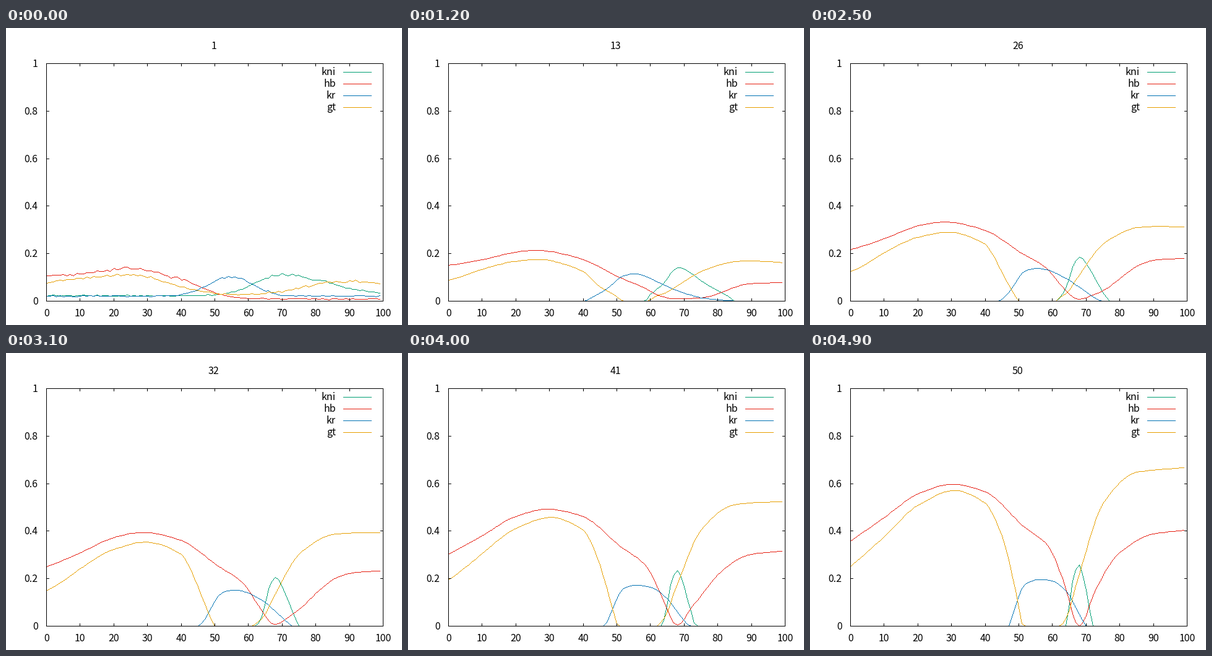
Write a matplotlib script that moves like this. It is 640 px wide and 480 px high and loops after 5000 ms.

```python
import numpy as np
import matplotlib.pyplot as plt
from matplotlib.animation import FuncAnimation

W, H, DPI = 640, 480, 100
FRAMES, INTERVAL = 50, 100
LEFT, RIGHT, TOP, BOTTOM = 65, 609, 57, 441
PX = 72 / DPI
POS = np.arange(100)


def bump(center, left, right=None):
    width = np.where(POS < center, left, right or left)
    return np.exp(-((POS - center) / width) ** 2)


def falling_edge(center, width):
    return 1 / (1 + np.exp((POS - center) / width))


def smooth_profile(points):
    """Shape-preserving cubic through a few (position, level) points."""
    xs, ys = np.array(points, float).T
    h = np.diff(xs)
    d = np.diff(ys) / h
    same_sign = d[:-1] * d[1:] > 0
    total = np.where(same_sign, d[:-1] + d[1:], 1)
    inner = np.where(same_sign, 2 * d[:-1] * d[1:] / total, 0)
    slope = np.concatenate([d[:1], inner, d[-1:]])
    k = np.clip(np.searchsorted(xs, POS, side="right") - 1, 0, len(h) - 1)
    t = (POS - xs[k]) / h[k]
    return (ys[k] * (1 + 2 * t) * (1 - t) ** 2
            + ys[k + 1] * t ** 2 * (3 - 2 * t)
            + h[k] * t * (1 - t) * (slope[k] * (1 - t) - slope[k + 1] * t))


# Every gene grows from a start to an end profile; negative levels are clipped,
# "power" eases the growth and "detour" bends the way between the two.
GENES = {
    "kni": dict(
        color="#009e73",
        start=0.023 + 0.088 * bump(70, 11, 20),
        end=smooth_profile([(0, -0.7), (50, -0.7), (57, -0.48), (60, -0.17), (64, 0),
                            (66, 0.19), (68, 0.258), (70, 0.15), (72, 0), (75, -0.17),
                            (82, -0.3), (91, -0.7), (99, -0.7)]),
        power=1.36,
        detour=0.2 * bump(73, 5)),
    "hb": dict(
        color="#e51e10",
        start=0.009 + (0.097 + 0.03 * bump(24, 12)) * falling_edge(46, 4),
        end=smooth_profile([(0, 0.358), (10, 0.457), (20, 0.556), (30, 0.597), (40, 0.566),
                            (51, 0.425), (59, 0.332), (63, 0.2), (68, 0), (73, 0.16),
                            (80, 0.31), (90, 0.388), (99, 0.403)]),
        power=1.24 + 1.7 * bump(71, 9),
        detour=0),
    "kr": dict(
        color="#0072b2",
        start=0.021 + 0.08 * bump(55, 9.5, 9),
        end=smooth_profile([(0, -0.4), (34, -0.38), (42, -0.12), (47, 0), (50, 0.125),
                            (52, 0.178), (56, 0.196), (60, 0.19), (64, 0.148), (70, 0),
                            (73, -0.05), (78, -0.07), (99, -0.25)]),
        power=1.36,
        detour=0.1 * bump(70, 5)),
    "gt": dict(
        color="#e69f00",
        start=0.025 + 0.085 * bump(25, 36, 16) + 0.06 * bump(88, 16, 25),
        end=smooth_profile([(0, 0.25), (10, 0.376), (20, 0.508), (31, 0.571), (40, 0.517),
                            (45, 0.38), (51, 0.01), (56, -0.35), (62, -0.01), (64, 0.03),
                            (68, 0.22), (75, 0.515), (85, 0.648), (99, 0.667)]),
        power=1.36 + 0.8 * bump(47, 4) + 0.55 * bump(0, 7),
        detour=-0.25 * bump(50, 4)),
}

rng = np.random.default_rng(4)
for gene in GENES.values():
    gene["noise"] = rng.normal(size=len(POS))


def levels(gene, i):
    s = (i / (FRAMES - 1)) ** gene["power"]
    level = gene["start"] * (1 - s) + gene["end"] * s + gene["detour"] * s * (1 - s)
    level = np.maximum(level, 0)
    level += 0.009 * np.exp(-0.45 * i) * np.sqrt(level) * gene["noise"]
    return np.maximum(level, 0)


def px_x(value):
    return np.rint(LEFT + value / 100 * (RIGHT - LEFT))


def px_y(value):
    return np.rint(BOTTOM - value * (BOTTOM - TOP))


def pixel_path(xs, ys):
    """Hard-edged polyline: one short dash inside every pixel it crosses."""
    px, py = [], []
    for x0, y0, x1, y1 in zip(xs[:-1], ys[:-1], xs[1:], ys[1:]):
        count = int(max(abs(x1 - x0), abs(y1 - y0))) + 1
        px.append(np.rint(np.linspace(x0, x1, count)))
        py.append(np.rint(np.linspace(y0, y1, count)))
    px, py = np.concatenate(px), np.concatenate(py) + 0.5
    gap = np.full_like(px, np.nan)
    return (np.stack([px + 0.3, px + 0.7, gap], axis=1).ravel(),
            np.stack([py, py, gap], axis=1).ravel())


plt.rcParams["font.family"] = "Noto Sans CJK JP"
plt.rcParams["path.simplify"] = False
fig = plt.figure(figsize=(W / DPI, H / DPI), dpi=DPI, facecolor="white")
ax = fig.add_axes([0, 0, 1, 1])
ax.set_xlim(0, W)
ax.set_ylim(H, 0)
ax.axis("off")


def stroke(xs, ys, color="black", zorder=5):
    return ax.plot(*pixel_path(xs, ys), color=color, lw=0.2 * PX, antialiased=False,
                   snap=False, solid_capstyle="butt", zorder=zorder)[0]


def label(x, y, text, align="center"):
    return ax.text(x, y, text, fontsize=16 * PX, ha=align, va="baseline", color="black")


def draw_axes():
    stroke([LEFT, RIGHT, RIGHT, LEFT, LEFT], [TOP, TOP, BOTTOM, BOTTOM, TOP])
    for value in range(0, 101, 10):
        x = px_x(value)
        stroke([x, x], [BOTTOM, BOTTOM - 4])
        stroke([x, x], [TOP, TOP + 4])
        label(x + 0.5, 466, str(value))
    for value in np.arange(6) / 5:
        y = px_y(value)
        stroke([LEFT, LEFT + 4], [y, y])
        stroke([RIGHT, RIGHT - 4], [y, y])
        label(51.5, y + 6, f"{value:g}", "right")


draw_axes()
curves = []
for row, (name, gene) in enumerate(GENES.items()):
    y = 71 + 19 * row
    label(533, y + 5, name, "right")
    stroke([545, 590], [y, y], gene["color"])
    curves.append(stroke(px_x(POS), px_y(levels(gene, 0)), gene["color"], 2 + row / 10))
title = label(335.7, 34, "")


def update(i):
    title.set_text(str(i + 1))
    for line, gene in zip(curves, GENES.values()):
        line.set_data(*pixel_path(px_x(POS), px_y(levels(gene, i))))
    return [title, *curves]


anim = FuncAnimation(fig, update, frames=FRAMES, interval=INTERVAL, repeat=True, repeat_delay=0)
plt.show()
```
